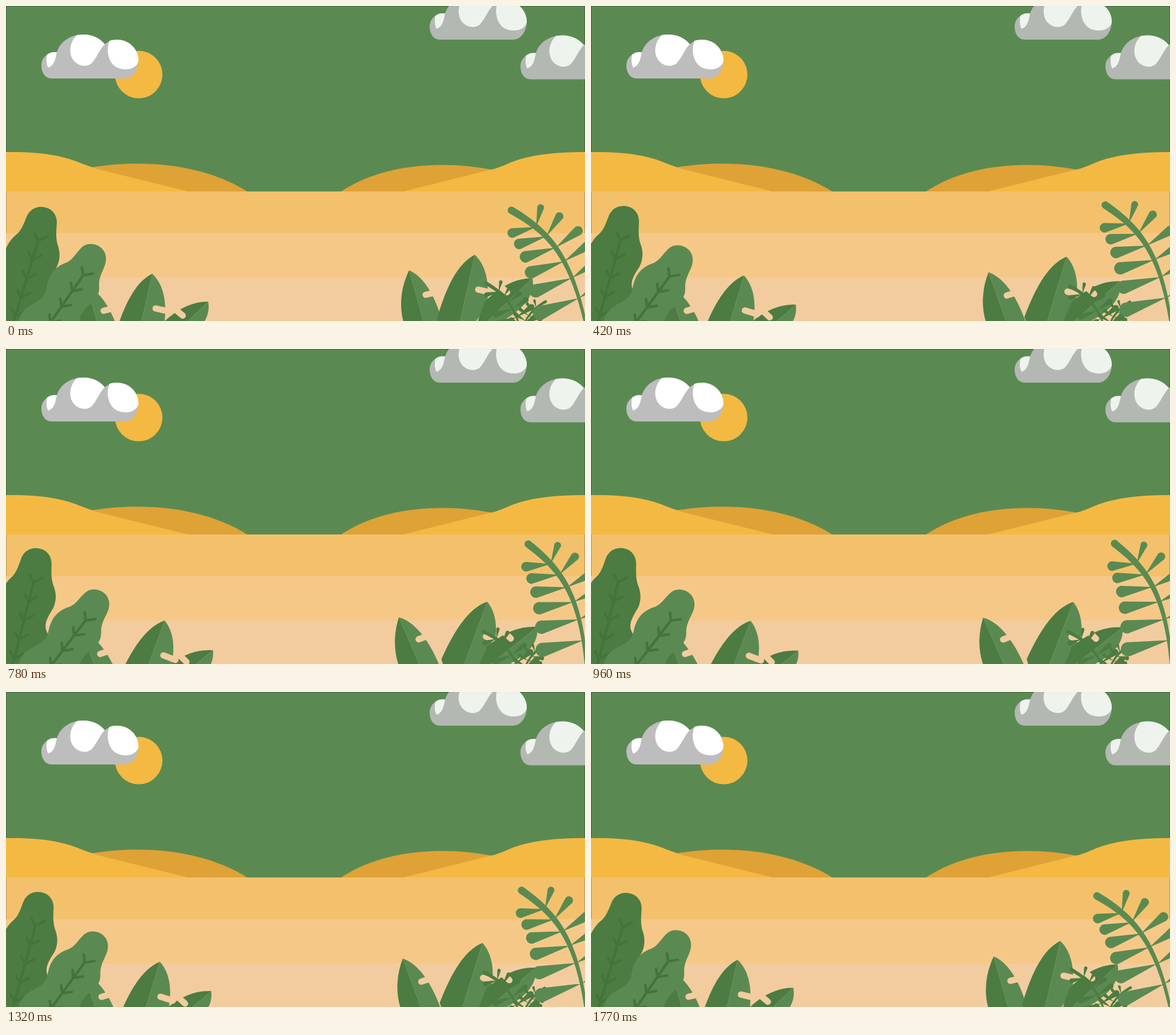
An HTML page for the animation above (1.8 s loop, 1014x552 px).

```html
<!DOCTYPE html>
<html lang="en">
<head>
<meta charset="utf-8">
<title>Desert oasis</title>
<style>
  html, body { margin: 0; width: 100%; height: 100%; overflow: hidden; background: #5a8a52; }
  svg { display: block; }
  .light { fill: #5a8a52; }
  .dark { fill: #4c7c42; }
  .notch { stroke: #f2cc9e; stroke-width: 11; stroke-linecap: round; }
  .vein { fill: none; stroke: #44733b; stroke-width: 4.5; stroke-linecap: round; stroke-linejoin: round; }
</style>
</head>
<body>
<svg width="1014" height="552" viewBox="0 0 1014 552">
  <defs>
    <g id="cloud">
      <path fill="#bdbdbd" d="M80 127C68 127 62 116 62 104C62 90 74 80 89 81C95 62 113 50 136 50C152 50 164 57 173 67C180 61 188 59 195 59C216 59 232 76 232 95C232 112 222 127 208 127Z"/>
      <g fill="#fff">
        <path d="M72 85C70 95 71 103 74 108C84 104 86 96 89 81C82 80 77 81 72 85Z"/>
        <path d="M124 51C110 65 110 84 118 95C127 107 145 108 152 98C160 88 164 76 173 67C164 55 146 47 124 51Z"/>
        <path d="M181 61C175 78 179 96 190 105C200 113 226 115 232 97C233 76 213 52 181 61Z"/>
      </g>
    </g>
    <g id="spike">
      <path class="dark" d="M256 469C226 484 206 525 190 580L218 640Z"/>
      <path class="light" d="M256 469C274 486 283 515 277 560L218 640Z"/>
      <path class="notch" d="M262 530L284 535"/>
    </g>
    <g id="blade">
      <path class="dark" d="M706 463C688 500 688 540 702 570L755 640Z"/>
      <path class="light" d="M706 463C745 480 765 545 772 590L755 640Z"/>
      <path class="notch" d="M735 506L752 502"/>
    </g>
    <g id="sprout">
      <path class="dark" d="M354 518C324 518 296 533 270 560L250 617Z"/>
      <path class="light" d="M354 518C359 545 345 580 250 617Z"/>
      <path class="notch" d="M309.5 542.5L292 528"/>
    </g>
    <path id="frond"/>
  </defs>

  <rect width="1014" height="552" fill="#5a8a52"/>
  <path d="M.5 325V.5H1013.5V325" fill="none" stroke="#000" stroke-opacity=".3"/>
  <circle cx="232.4" cy="120.2" r="41.6" fill="#f4b942"/>
  <use href="#cloud"/>
  <use href="#cloud" x="680" y="-68" opacity=".9"/>
  <use href="#cloud" x="839" y="1.5" opacity=".9"/>

  <g fill="#dfa236">
    <path d="M148 283C235 268 345 276 423 325.5H148Z"/>
    <path d="M586 325.5C660 276 765 270 852 287V325.5Z"/>
  </g>
  <g fill="#f4b942">
    <path d="M0 256C60 255 100 262 130 275C143 280 153 283.5 165 287L320 325.5H0Z"/>
    <path d="M1014 256C960 256 915 261 882 275C868 281 858 285 848 287L694 325.5H1014Z"/>
  </g>
  <rect y="325" width="1014" height="74" fill="#f3c16b"/>
  <path d="M.5 325V398M1013.5 325V398" stroke="#000" stroke-opacity=".25"/>
  <rect y="398" width="1014" height="79" fill="#f6c888"/>
  <rect y="476" width="1014" height="76" fill="#f2cc9e"/>

  <!-- data-swing: degrees at the far end, pivot x, pivot y -->
  <g data-swing="6 248 617"><use href="#sprout"/></g>
  <g data-swing="9 218 633"><use href="#spike"/></g>
  <g data-swing="-6 172 600"><use href="#blade" x="-564" y="28"/></g>
  <g data-swing="-3 -8 582">
    <path class="dark" d="M35 372C40 358 50 352 61 352C78 352 90 364 89 381C88 395 87 405 90 417C97 435 93 450 88 459C77 475 72 484 74 495C76 503 80 508 85 512V620H-60V540L-30 520C-14 490 -14 424 20 399C27 392 31 382 35 372Z"/>
    <path class="vein" id="tallVein"/>
  </g>
  <g data-swing="3 60 571">
    <path class="light" d="M128 428C134 420 141 417 148 417C164 417 176 429 175 444C175 458 163 470 163 488C163 495 164 500 160 508C156 520 132 528 128 552L120 610H20L22 552C30 520 58 525 69 502C73 492 70 462 107 449C118 443 121 435 128 428Z"/>
    <path class="vein" id="shortVein"/>
  </g>

  <g data-swing="-9 749 598"><use href="#blade"/></g>
  <g data-swing="9 783 600"><use href="#spike" x="565" y="-33"/></g>
  <g data-swing="6 816 576"><use href="#sprout" x="568" y="-41"/></g>
  <g data-swing="-5 960 555" class="dark">
    <use href="#frond" transform="translate(841 486) scale(.5)"/>
    <use href="#frond" transform="translate(945 518) scale(-.38 .38)"/>
  </g>
  <g data-swing="9 1018 567" class="light"><use href="#frond" x="885" y="358"/></g>
</svg>
<script>
  const setPath = (id, d) => document.getElementById(id).setAttribute('d', d);
  const range = (count, make) => Array.from({ length: count }, (_, i) => make(i));

  // A straight row of forks, joined by the main vein.
  function veins(x, y, dx, dy, [lx, ly], [rx, ry]) {
    const forks = range(6, i => [x + dx * i, y + dy * i]);
    return 'M' + forks.join('L') +
      forks.map(([x, y]) => `M${x + lx} ${y + ly}L${x} ${y}L${x + rx} ${y + ry}`).join('');
  }

  // A wedge growing from a point to a round end of radius r.
  function leaflet([x, y], degrees, length, r) {
    const angle = degrees * Math.PI / 180, cos = Math.cos(angle), sin = Math.sin(angle);
    const endX = x + cos * length, endY = y + sin * length;
    return `M${x} ${y}L${endX + sin * r} ${endY - cos * r}` +
      `A${r} ${r} 0 0 1 ${endX - sin * r} ${endY + cos * r}Z`;
  }

  // The stem is a cubic curve from the tip at the origin.
  const bezier = (t, b, c, d) => 3 * t * (1 - t) ** 2 * b + 3 * t * t * (1 - t) * c + t ** 3 * d;
  const stem = t => [bezier(t, 60, 103, 131), bezier(t, 35, 72, 204)];

  function frond() {
    const side = sign => range(25, i => {
      const t = i / 24, [x, y] = stem(t), [nextX, nextY] = stem(t + .01);
      const half = sign * (6.5 - 4 * t) / Math.hypot(nextX - x, nextY - y);
      return [x + (nextY - y) * half, y - (nextX - x) * half];
    });
    const outer = side(1), inner = side(-1).reverse();
    const stalk = `M${outer.join('L')}L${inner.join('L')}A6.5 6.5 0 0 1 ${outer[0]}Z`;
    return stalk + range(6, i => {
      const base = stem(.26 + .12 * i);
      return leaflet(base, 166 - 1.4 * i, 43 + 6 * i, 8.5 + .8 * i) +
        leaflet(base, -Math.max(34, 77 - 20 * i), 35 + 7 * i, 6 + 1.2 * i);
    }).join('');
  }

  setPath('tallVein', veins(56, 412, -10, 33, [-6, -13], [16, -8]));
  setPath('shortVein', veins(135, 472, -19, 27.5, [-2, -14], [17, -3]));
  setPath('frond', frond());

  const swinging = [...document.querySelectorAll('[data-swing]')].map(node => {
    const [angle, x, y] = node.dataset.swing.split(' ').map(Number);
    return { node, angle, x, y };
  });

  function draw() {
    const phase = 1 - Math.abs(1 - performance.now() % 1800 / 900);
    for (const { node, angle, x, y } of swinging)
      node.setAttribute('transform', `rotate(${angle * phase} ${x} ${y})`);
    requestAnimationFrame(draw);
  }
  draw();
</script>
</body>
</html>
```
